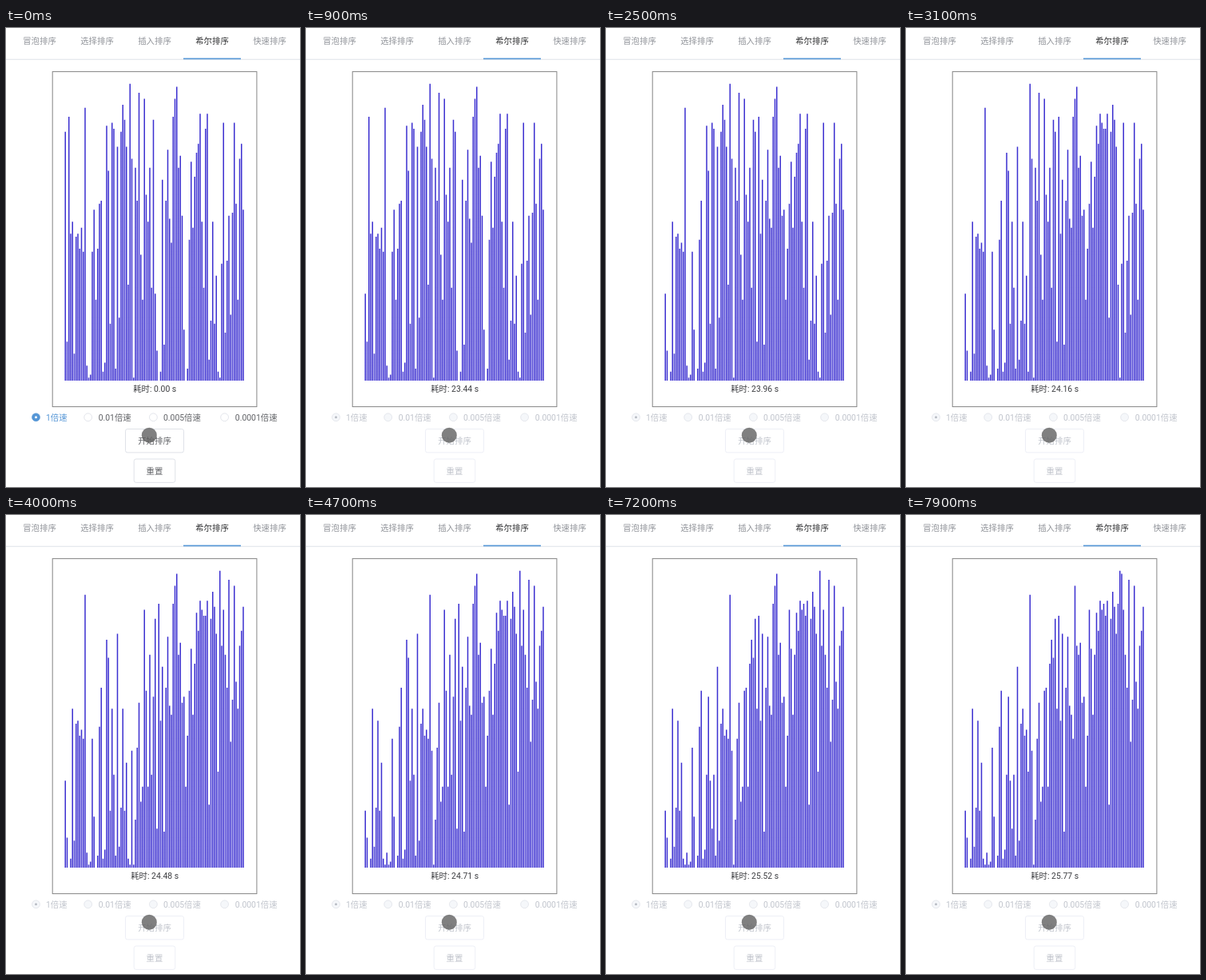
These frames come from a looping animation (368 by 574 pixels, 8 s). An HTML page:

```html
<!DOCTYPE html>
<html lang="zh">
<head>
<meta charset="utf-8">
<title>希尔排序</title>
<style>
html, body { margin: 0; width: 100%; height: 100%; overflow: hidden; background: #fff; }
svg { display: block; width: 100vw; height: 100vh; }
text { font: 10.4px Roboto, "Noto Sans CJK SC", "Noto Sans CJK", sans-serif; }
</style>
</head>
<body>
<svg id="stage" viewBox="0 0 368 574"></svg>
<script>
const LOOP = 8000, TICK = 100, START = 500;
const BASE = 441, UNIT = 3.75, LEFT = 73.5, PITCH = 2.25;

const values = [
  83, 13, 88, 49, 53, 9, 48, 49, 44, 51, 43, 91, 5, 1, 2, 43, 57, 27, 44, 59,
  60, 3, 6, 85, 70, 19, 86, 84, 4, 78, 21, 83, 92, 87, 78, 32, 99, 74, 1, 71,
  60, 96, 42, 27, 94, 62, 53, 71, 31, 87, 29, 10, 0, 3, 67, 12, 60, 77, 54, 46,
  88, 94, 98, 71, 75, 55, 17, 0, 4, 47, 73, 51, 68, 76, 79, 89, 53, 31, 84, 89,
  7, 20, 53, 19, 35, 3, 1, 39, 86, 16, 40, 55, 22, 56, 86, 59, 27, 74, 79, 57
];

// [time in ms, insertions finished]
const pace = [[500, 0], [1300, 3], [1400, 4], [2200, 16], [2300, 17], [3100, 36], [3200, 37],
  [3900, 50], [4000, 50], [4100, 51], [5600, 80], [7200, 105], [7700, 112], [7900, 114]];
// [time in ms, seconds shown]
const clock = [[500, 23.31], [1500, 23.64], [3100, 24.16], [4000, 24.48],
  [5600, 25], [7200, 25.52], [7900, 25.77]];

const stage = document.getElementById('stage');

function add(tag, attrs, content) {
  const node = document.createElementNS('http://www.w3.org/2000/svg', tag);
  set(node, attrs);
  if (content) node.textContent = content;
  return stage.appendChild(node);
}

function set(node, attrs) {
  for (const key in attrs) node.setAttribute(key, attrs[key]);
}

function label(x, y, content, fill, anchor = 'middle') {
  return add('text', { x, y, fill, 'text-anchor': anchor }, content);
}

function lerpPoints(points, t) {
  if (t <= points[0][0]) return points[0][1];
  for (let i = 1; i < points.length; i++) {
    const [t0, a] = points[i - 1], [t1, b] = points[i];
    if (t <= t1) return a + (b - a) * (t - t0) / (t1 - t0);
  }
  return points[points.length - 1][1];
}

// Shell sort stopped after a number of insertions
function shellSort(count) {
  const a = values.slice();
  for (let gap = 50; gap > 0; gap >>= 1) {
    for (let i = gap; i < a.length; i++) {
      if (count-- <= 0) return a;
      const v = a[i];
      let j = i;
      for (; j >= gap && a[j - gap] > v; j -= gap) a[j] = a[j - gap];
      a[j] = v;
    }
  }
  return a;
}

add('rect', { width: 368, height: 574, fill: '#fff' });

add('rect', { y: 38.7, width: 368, height: 1.2, fill: '#e4e7ed' });
['冒泡排序', '选择排序', '插入排序', '希尔排序', '快速排序'].forEach((name, i) =>
  label(42 + 72 * i, 20.2, name, i === 3 ? '#303133' : '#909399'));
add('rect', { x: 222, y: 37.6, width: 72, height: 1.6, fill: '#5596d6' });

add('rect', { x: 58.2, y: 54.6, width: 255.7, height: 419, fill: 'none', stroke: '#858585' });
const bars = add('path', { fill: '#3b2fd0' });
const timer = label(186.2, 455.2, '', '#3c3d40');

const radios = [[37.5, 50, '1倍速'], [102.7, 115.7, '0.01倍速'],
  [184.4, 197, '0.005倍速'], [273.6, 286.8, '0.0001倍速']].map(([cx, x, name]) => ({
  ring: add('circle', { cx, cy: 486.8, r: 4.9, 'stroke-width': 0.8 }),
  dot: add('circle', { cx, cy: 486.8, r: 1.5 }),
  text: label(x, 491.2, name, '', 'start')
}));

const buttons = [[149.5, 501.5, 73, 29.4, '开始排序'], [160.2, 539, 51.6, 29.4, '重置']]
  .map(([x, y, width, height, name]) => ({
    box: add('rect', { x, y, width, height, rx: 2.6, fill: '#fff', 'stroke-width': 0.9 }),
    text: label(186, y + 18.8, name, '')
  }));

add('circle', { cx: 179.3, cy: 509.3, r: 9.5, fill: '#5c5c5c', 'fill-opacity': 0.78 });

function mix(from, to, p) {
  return 'rgb(' + from.map((c, i) => Math.round(c + (to[i] - c) * p)) + ')';
}

function render(time) {
  const t = Math.floor(time / TICK) * TICK;
  const busy = t >= START;

  const heights = shellSort(Math.floor(lerpPoints(pace, t) + 1e-6));
  set(bars, {
    d: heights.map((v, i) =>
      v ? `M${LEFT + PITCH * i} ${BASE}v${-UNIT * v}h1.5V${BASE}z` : '').join('')
  });
  timer.textContent = `耗时: ${(busy ? lerpPoints(clock, t) : 0).toFixed(2)} s`;

  radios.forEach(({ ring, dot, text }, i) => {
    const active = i === 0 && !busy;
    set(ring, {
      fill: active ? '#5596d6' : busy ? '#f5f7fa' : '#fff',
      stroke: active ? '#5596d6' : busy ? '#e0e3e9' : '#dcdfe6'
    });
    set(dot, { fill: i ? 'none' : busy ? '#b8bcc4' : '#fff' });
    set(text, { fill: active ? '#5596d6' : busy ? '#c0c4cc' : '#606266' });
  });

  const fade = Math.min(1, Math.max(0, (t - START + TICK) / 300));
  for (const { box, text } of buttons) {
    set(box, { stroke: mix([220, 223, 230], [235, 238, 245], fade) });
    set(text, { fill: mix([96, 98, 102], [192, 196, 204], fade) });
  }
}

const origin = performance.now();
function loop() {
  render((performance.now() - origin) % LOOP);
  requestAnimationFrame(loop);
}
loop();
</script>
</body>
</html>
```
